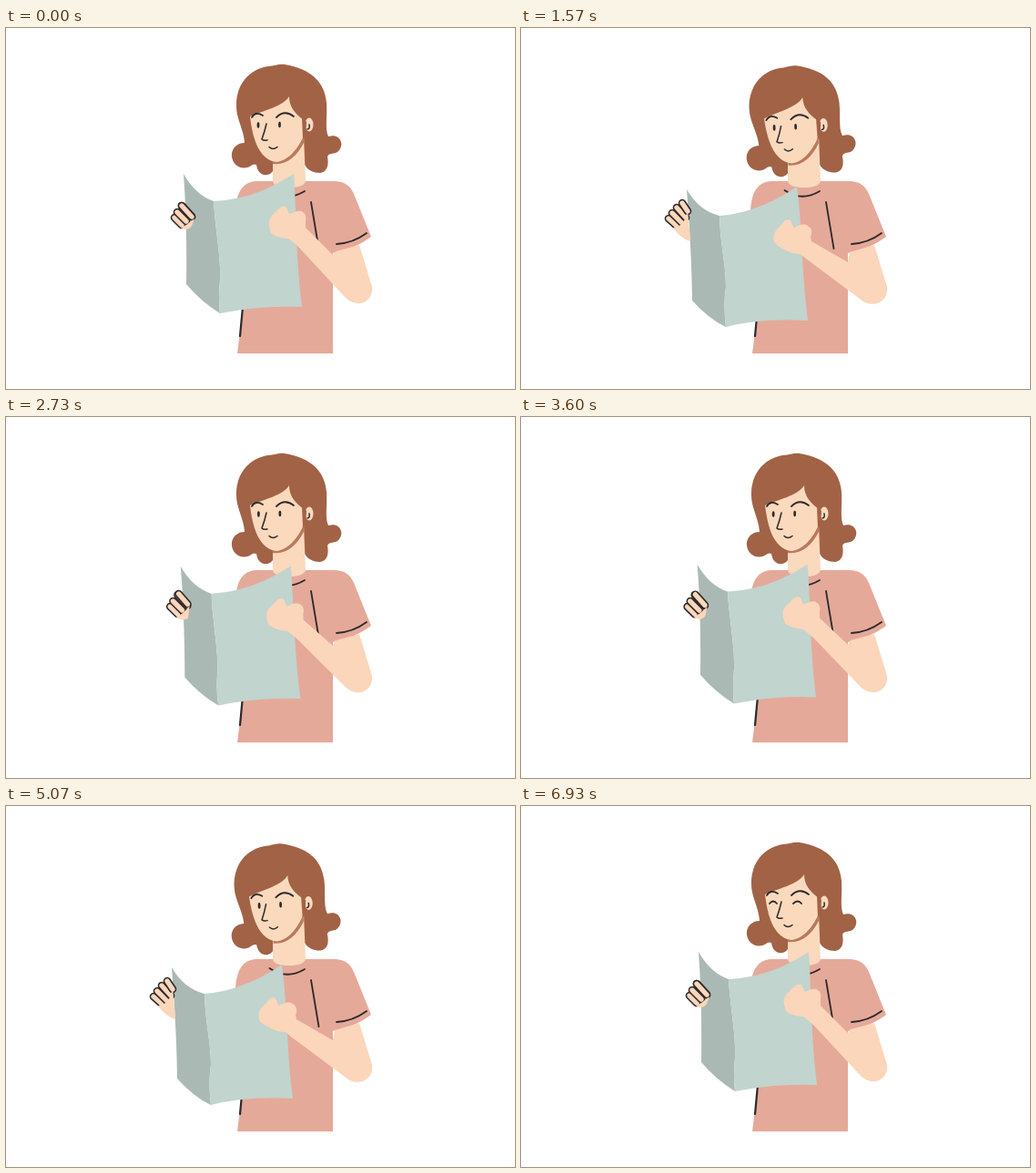
Recreate the animation shown at these times as an HTML page. Size 559 by 396 pixels, loop 7.01 s.

```html
<!DOCTYPE html>
<html>
<head>
<meta charset="utf-8">
<style>
  html, body { margin: 0; width: 100%; height: 100%; overflow: hidden; background: #fff; }
  svg { display: block; width: 100vw; height: 100vh; }
  .hair { fill: #a26246; }
  .skin { fill: #fbd6ba; }
  .face { fill: #fad9bd; }
  .shirt { fill: #e5a999; }
  .line { fill: none; stroke: #2c2a2b; stroke-width: 1.8; stroke-linecap: round; }
  .thin { stroke-width: 1.5; }
</style>
</head>
<body>
<svg viewBox="0 0 559 396">
  <path class="shirt" d="M254 357L260 310L252 200C253 180 260 168 276 168H360C372 168 378 173 382 182L401 229Q382 243 362 246L359 247V357Z"/>
  <path id="hair" class="hair" d="M306 40C300 39 295 42 288 42C266 45 252 64 253 86C253 100 261 111 262 126C253 126 247 133 248 141C249 150 257 155 265 153C269 152 271 148 275 150C276 158 281 162 287 161C292 160 294 156 296 150H328C331 156 338 159 345 159C352 158 355 152 353 141C355 137 359 138 362 137C367 135 369 129 368 125C366 119 361 117 354 119C350 110 353 99 352 82C350 59 335 45 306 40Z"/>
  <path class="face" d="M293 138L327 118L329 168Q327 175 311 175Q294 175 293 168Z"/>
  <g id="head">
    <path fill="#b97a5d" d="M293 145C309 147 320 134 327 117V126C319 141 308 151 293 149Z"/>
    <path class="face" d="M268 97C281 91 305 86 311 75C311 86 317 94 327 101L327 118C320 134 309 146 297 147C285 146 277 135 273 122C270 112 269 105 268 97Z"/>
    <ellipse class="face" cx="333" cy="106" rx="4.5" ry="7.5"/>
    <path class="hair" d="M325 98L330 103L329 118L326 122Z"/>
    <path class="line thin" d="M331 111Q334 111 333 106"/>
    <g id="features">
      <g class="line">
        <path d="M270 98Q274 91 282 96M297 98Q306 89 316 97"/>
        <path class="thin" d="M286 105Q284 114 281 122Q283 124 287 123M289 130.500Q293 134.500 298 130.500"/>
        <path id="closed" d="M273 107Q277 102 281 107M299 107Q304 102 308 107"/>
      </g>
      <g id="open" fill="#2c2a2b">
        <ellipse cx="277" cy="106.500" rx="1.4" ry="3.3"/>
        <ellipse cx="300.500" cy="106" rx="1.4" ry="3.3"/>
      </g>
    </g>
  </g>
  <path class="line" d="M289.500 178Q308 191 328 179M335 191L343.500 242M363 237Q381 236 396 225"/>
  <path class="line" style="stroke-width:2.2" d="M260 306L257 338"/>
  <path id="leftPage" fill="#abb9b4"/>
  <path id="rightPage" fill="#c1d4cd"/>
  <g id="fingers" fill="none" stroke-linecap="round"></g>
  <path id="palm" class="skin"/>
  <path id="arm" class="skin"/>
</svg>
<script>
const PERIOD = 3500, LOOP = 7010;
const $ = id => document.getElementById(id);

// Poses per part: raised, lowered, lowered with the bottom swung right.
const parts = {
  leftPage: [
    'M195 160Q208 183 228 190C230 222 236 250 235 276Q233 298 235 313Q214 300 198 281Q199 215 195 160Z',
    'M182 177Q195 200 218 206C219 238 225 260 225 284Q222 303 225 328Q206 319 188 299Q187 235 182 177Z',
    'M182 177Q195 200 218 206C217 238 223 260 224 284Q222 303 228 328Q209 319 191 300Q187 235 182 177Z'
  ],
  rightPage: [
    'M228 190Q274 188 316 160C319 200 318 250 325 306Q280 304 235 313Q233 298 235 276C236 250 230 222 228 190Z',
    'M218 206Q262 202 303 174C309 215 308 270 315 321Q264 318 225 328Q222 303 225 284C225 260 219 238 218 206Z',
    'M218 206Q262 202 303 174C306 215 311 270 318 319Q266 318 228 328Q222 303 224 284C223 260 217 238 218 206Z'
  ],
  palm: [
    'M192 219L198 216L203 212L207 209L204 217Q199 224 192 219Z',
    'M167 219L174 217L180 210L183 200L186 234Q174 230 167 219Z',
    'M170 218L177 216L183 209L185 200L187 233Q176 229 170 218Z'
  ],
  arm: [
    'M290 221C287 214 289 208 294 204C299 199 303 194 307 196C310 198 309 202 312 204C316 202 320 200 324 201C329 203 330 207 329 212L329 219L359 249L362 245L388 238L402 284C404 298 389 309 374 297L322 241C319 238 315 235 310 231C305 231 296 229 291 225Z',
    'M278 235C276 228 279 222 283 219C287 215 289 210 294 210C298 211 297 216 300 219C305 216 311 214 315 217C320 220 320 225 318 229L319 234L359 257L361 246L388 238L402 284C404 298 390 308 376 300L317 256C313 253 310 251 307 248C300 249 288 243 281 238Z'
  ]
};

const fingerPoses = [
  ['M185 208L193 216', 'M162 209L171 217', 'M165 208L174 216'],
  ['M188 202L198 212', 'M166 203L176 213', 'M169 202L179 212'],
  ['M193 195L204 207', 'M171 197L181 208', 'M174 196L184 207'],
  ['M193 195L204 207', 'M177 192L183 201', 'M179 191L185 200']
];
fingerPoses.forEach((poses, i) => {
  for (const [name, color, width] of [['edge', '#2c2a2b', 8.6], ['fill', '#fbd6ba', 5.4]]) {
    const finger = document.createElementNS('http://www.w3.org/2000/svg', 'path');
    finger.id = name + i;
    finger.setAttribute('stroke', color);
    finger.setAttribute('stroke-width', width);
    $('fingers').append(finger);
    parts[finger.id] = poses;
  }
});

const clamp = x => Math.min(1, Math.max(0, x));
const smooth = x => x * x * (3 - 2 * x);
const ramp = (t, from, to) => smooth(clamp((t - from) / (to - from)));
// Softer ease for the arms: halfway between linear and smooth.
const glide = (t, from, to) => (clamp((t - from) / (to - from)) + ramp(t, from, to)) / 2;

function mix(a, b, k) {
  const ends = b.match(/[\d.]+/g);
  let i = 0;
  return a.replace(/[\d.]+/g, n => (+n + (ends[i++] - n) * k).toFixed(2));
}

// Ten poses in every 700 ms, the first held for 100 ms.
function step(t) {
  const local = t % 700, pace = 600 / 9;
  return t - local + (local < 100 ? 0 : 100 + Math.floor((local - 100) / pace) * pace);
}

function draw(now) {
  const t = step(Math.min(now % LOOP, 2 * PERIOD - 1)) % PERIOD;
  const low = glide(t, 0, 690) - glide(t, 2230, 2840);
  const swing = ramp(t, 1870, 2270);
  for (const id in parts) {
    const [up, down, swung = down] = parts[id];
    $(id).setAttribute('d', mix(up, mix(down, swung, swing), low));
  }

  const tilt = ramp(t, 140, 680) - ramp(t, 1700, 2250);
  const move = (id, transform) => $(id).setAttribute('transform', transform);
  move('hair', `rotate(${-2.3 * tilt} 335 145)`);
  move('head', `translate(0 ${0.5 * tilt}) rotate(${-1.8 * tilt} 330 130)`);
  move('features', `translate(${0.3 * tilt} ${0.8 * tilt})`);
  move('open', `translate(${1.5 * low} 0)`);

  const blink = t > 3290;
  $('closed').style.display = blink ? '' : 'none';
  $('open').style.display = blink ? 'none' : '';
  requestAnimationFrame(() => draw(performance.now() - start));
}
const start = performance.now();
draw(0);
</script>
</body>
</html>
```
